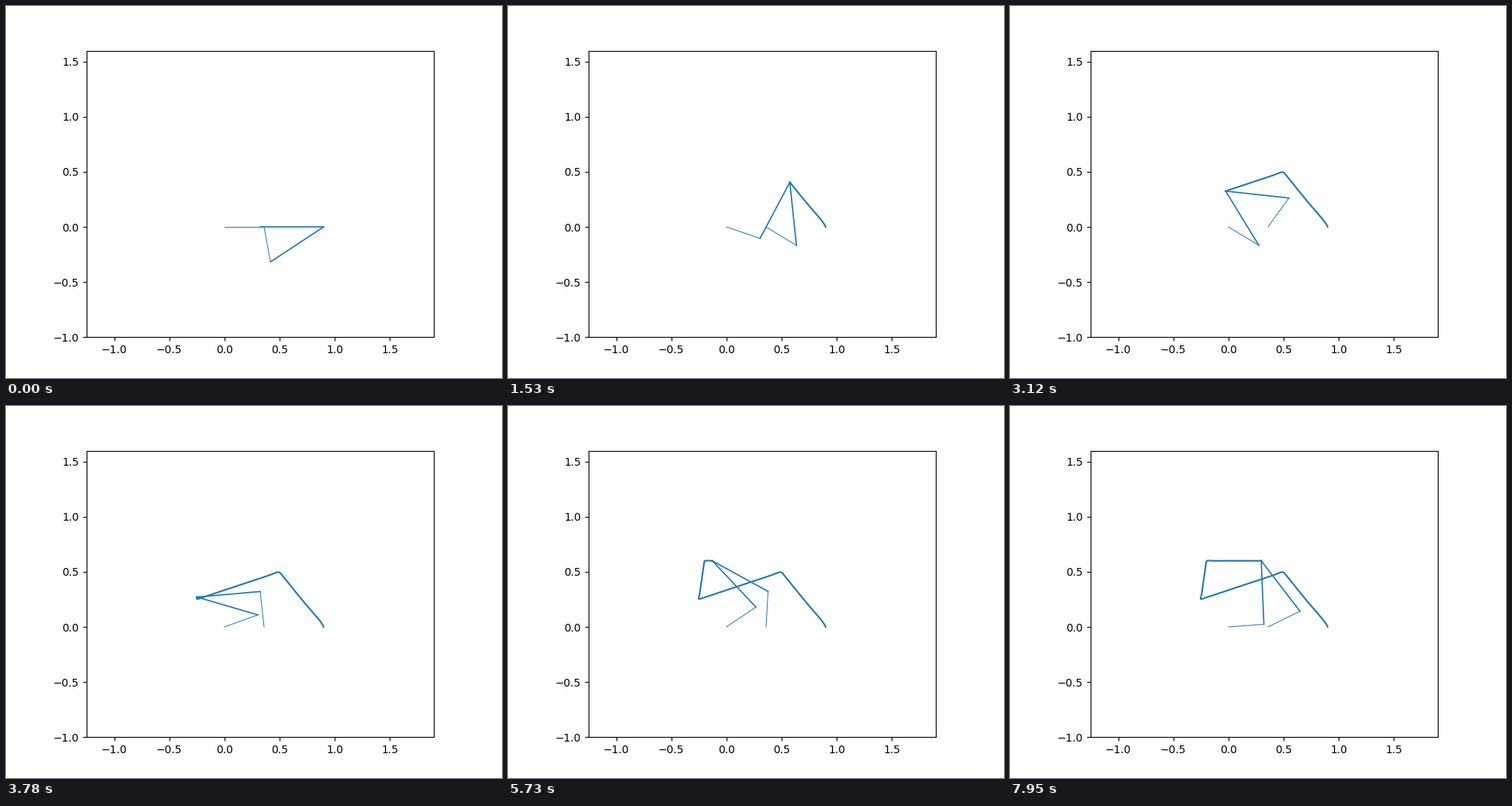
These frames come from a looping animation (640x480 px, 8 s). A matplotlib script:

```python
import numpy as np
import matplotlib.pyplot as plt
from matplotlib.animation import FuncAnimation

LOOP, STEP = 8000, 20           # ms
CRANK, ROD = 0.323, 0.577       # link lengths of the five-bar linkage
BASES = np.array([[0.0, 0.0], [0.36, 0.0]])
WAYPOINTS = np.array([[0.9, 0.0], [0.5, 0.5], [-0.25, 0.25],
                      [-0.2, 0.6], [0.298, 0.6]])
LEG = 1.8                       # seconds between waypoints
OMEGA, ZETA = 20.0, 0.6         # response of the position controller
DT = 0.001


def reference(t):
    """Straight-line reference through the waypoints."""
    knots = LEG * np.arange(len(WAYPOINTS))
    return np.column_stack([np.interp(t, knots, c) for c in WAYPOINTS.T])


def simulate():
    """Tip path of a second-order system that follows the reference."""
    t = np.arange(0, LOOP / 1000 + DT, DT)
    ref = reference(t)
    pos, vel = WAYPOINTS[0].copy(), np.zeros(2)
    path = np.empty_like(ref)
    for i, goal in enumerate(ref):
        path[i] = pos
        vel += DT * (OMEGA**2 * (goal - pos) - 2 * ZETA * OMEGA * vel)
        pos = pos + DT * vel
    # x starts sluggishly out of the stretched pose
    s = t / 0.3
    path[:, 0] += 0.011 * s**2 * np.exp(2 - 2 * s)
    reach = np.hypot(*path.T)
    return path * np.minimum(1, (CRANK + ROD) / reach)[:, None]


def elbow(base, tip):
    v = tip - base
    d = np.hypot(*v)
    u = v / d
    along = (CRANK**2 - ROD**2 + d**2) / (2 * d)
    side = np.sqrt(max(CRANK**2 - along**2, 0))
    return base + along * u + side * np.array([u[1], -u[0]])


path = simulate()

fig, ax = plt.subplots(figsize=(6.4, 4.8), dpi=100)
ax.set_aspect("equal")
ax.set_xlim(-1.25, 1.9)
ax.set_ylim(-1.0, 1.6)

cranks = [ax.plot([], [], color="C0", lw=0.7)[0] for _ in BASES]
rods = [ax.plot([], [], color="C0", lw=1.2)[0] for _ in BASES]
trace, = ax.plot([], [], color="C0", lw=1.5)


def update(i):
    k = i * STEP
    tip = path[k]
    for base, crank, rod in zip(BASES, cranks, rods):
        joint = elbow(base, tip)
        crank.set_data(*np.array([base, joint]).T)
        rod.set_data(*np.array([joint, tip]).T)
    trace.set_data(*path[:k + 1:10].T)
    return [*cranks, *rods, trace]


anim = FuncAnimation(fig, update, frames=LOOP // STEP, interval=STEP,
                     repeat=True, repeat_delay=0, blit=False)
plt.show()
```
